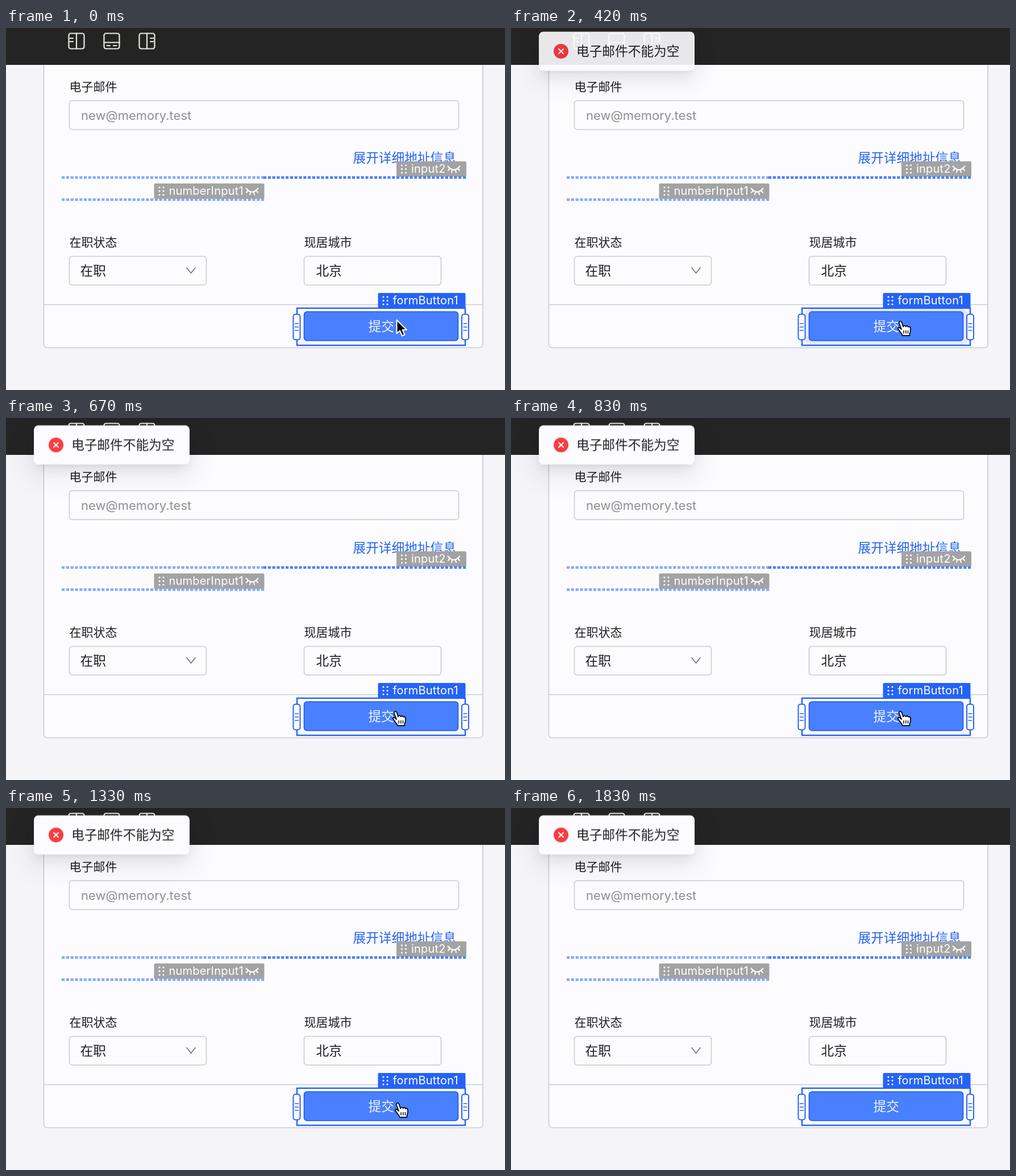
Animation of 878 by 638 pixels, one loop 2.33 s. Source, as an HTML page:

```html
<!DOCTYPE html>
<html lang="zh-CN">
<head>
<meta charset="utf-8">
<title>表单校验</title>
<style>
  html, body { margin: 0; width: 100%; height: 100%; overflow: hidden; background: #f5f5f9; }
  svg { position: absolute; left: 0; top: 0; display: block; }
  text { font-family: Inter, "Noto Sans CJK SC", "Noto Sans CJK", sans-serif; }

  .label { font-size: 21px; fill: #1d1d22; }
  .value { font-size: 22.7px; fill: #1d1d22; }
  .tag { font-size: 20px; letter-spacing: .2px; fill: #fff; }
  .field { fill: #fcfcff; stroke: #c7cbd4; stroke-width: 1.6; }
  .line { fill: none; stroke-linecap: round; stroke-linejoin: round; }
  .dots { stroke-width: 4.6; stroke-dasharray: 5.2 2.6; }
  .handle { fill: #fff; stroke: #2563f8; stroke-width: 2; }

  .toast {
    position: absolute; left: 49px; top: 13px; width: 274px; height: 68.5px;
    border-radius: 8px; background: #fcfcff;
    box-shadow: 0 5px 10px -6px #0000001f, 0 10px 26px #00000014, 0 15px 45px 13px #0000000f;
  }

  .toast, .wave, .arrow, .hand { animation: 2330ms step-end infinite; }
  .toast { animation-name: toast; }
  .wave { animation-name: wave; }
  .arrow { animation-name: arrow; }
  .hand { animation-name: hand; }

  @keyframes toast {
    0% { opacity: 0; transform: translateY(-6.5px); }
    18.02% { opacity: .91; transform: translateY(-6.5px); }
    21.45% { opacity: .99; transform: translateY(-1px); }
    24.88%, 100% { opacity: 1; transform: none; }
  }
  @keyframes wave {
    0% { opacity: 0; }
    18.02% { opacity: .12; }
    21.45% { opacity: .06; }
    24.88% { opacity: .03; }
    28.74%, 100% { opacity: 0; }
  }
  @keyframes arrow {
    0% { opacity: 1; transform: none; }
    10.72% { opacity: 0; }
    67.8% { opacity: 1; transform: translate(37px, 53px); }
    71.66% { opacity: 1; transform: translate(44px, 73px); }
    75.1% { opacity: 1; transform: translate(49px, 89px); }
    78.53%, 100% { opacity: 0; }
  }
  @keyframes hand {
    0% { opacity: 0; transform: none; }
    10.72% { opacity: 1; transform: none; }
    57.07% { opacity: 1; transform: translate(4px, 3px); }
    60.93% { opacity: 1; transform: translate(15px, 14px); }
    64.36% { opacity: 1; transform: translate(27px, 29px); }
    67.8%, 100% { opacity: 0; }
  }
</style>
</head>
<body>
<svg width="878" height="638" viewBox="0 0 878 638">
  <defs>
    <g id="grip" fill="#fff">
      <circle cx="0" cy="-6.5" r="1.6"/><circle cx="7" cy="-6.5" r="1.6"/>
      <circle cx="0" cy="0" r="1.6"/><circle cx="7" cy="0" r="1.6"/>
      <circle cx="0" cy="6.5" r="1.6"/><circle cx="7" cy="6.5" r="1.6"/>
    </g>
    <path id="eye" class="line" stroke="#fff" stroke-width="2"
      d="M-10.5 -5Q0 8 10.5 -5M-7 -1L-10 2.5M-2.8 1.5L-4 6M2.8 1.5L4 6M7 -1L10 2.5"/>
    <g id="handle">
      <rect class="handle" x="-6" y="-22.5" width="12" height="45" rx="4"/>
      <path d="M-3.5 -6h7M-3.5 0h7M-3.5 6h7" stroke="#2563f8" stroke-width="1.6"/>
    </g>
    <g id="sidebar">
      <rect x="-13.5" y="-13.5" width="27" height="27" rx="3.5"/>
      <path d="M0 -13.5v27M-11.5 -5h5.5M-11.5 1h5.5"/>
    </g>
  </defs>

  <rect x="66.5" y="40" width="772.5" height="523.5" rx="6" class="field"/>
  <path d="M66.5 487.5H839" stroke="#c7cbd4" stroke-width="1.6"/>

  <rect width="878" height="65" fill="#242424"/>
  <g class="line" stroke="#e9e9e2" stroke-width="2.2">
    <use href="#sidebar" x="124" y="23"/>
    <use href="#sidebar" transform="translate(248 23) scale(-1 1)"/>
    <rect x="172.5" y="9.5" width="27" height="27" rx="3.5"/>
    <path d="M172.5 25.5h27M177.5 31h5.5M189 31h5.5"/>
  </g>

  <text class="label" x="111.5" y="110.7">电子邮件</text>
  <rect class="field" x="111.5" y="128" width="685" height="51" rx="5"/>
  <text x="132" y="161.5" font-size="22" fill="#8f8f90">new@memory.test</text>

  <text class="value" x="610.5" y="236.5" style="fill:#2462f5">展开详细地址信息</text>
  <rect x="687" y="235" width="123" height="27" rx="2" fill="#a3a3a4"/>
  <use href="#grip" x="696.5" y="248.5"/>
  <text class="tag" x="713" y="255.2">input2</text>
  <use href="#eye" x="788" y="248.5"/>
  <path class="dots" d="M98 263.5H453" stroke="#84a8ff"/>
  <path class="dots" d="M453 263.5H810" stroke="#4a7ff8"/>

  <rect x="260.5" y="274" width="194" height="27" rx="2" fill="#a3a3a4"/>
  <use href="#grip" x="270" y="287.5"/>
  <text class="tag" x="286.5" y="294.2">numberInput1</text>
  <use href="#eye" x="433" y="287.5"/>
  <path class="dots" d="M98 302.5H454.5" stroke="#84a8ff"/>

  <text class="label" x="111.5" y="384.7">在职状态</text>
  <rect class="field" x="111.5" y="402.5" width="241" height="50.5" rx="5"/>
  <text class="value" x="130.5" y="436">在职</text>
  <path class="line" d="M318 422.5L325.5 432L333 422.5" stroke="#777a86" stroke-width="1.8"/>
  <text class="label" x="524.5" y="384.7">现居城市</text>
  <rect class="field" x="524.5" y="402.5" width="241" height="50.5" rx="5"/>
  <text class="value" x="545.5" y="436">北京</text>

  <rect x="512" y="493.8" width="296" height="65.4" fill="#fcfcff" stroke="#2563f8" stroke-width="2.4"/>
  <rect class="wave" x="516" y="495" width="288" height="63" rx="10" fill="#2563f8"/>
  <rect x="524.5" y="500" width="271" height="51" rx="5" fill="#4880ff" stroke="#1d55ec" stroke-width="1.6"/>
  <text class="value" x="637.5" y="533.7" style="fill:#f0f4ff">提交</text>
  <path d="M654.5 495V469q0-2 2-2h150q2 0 2 2v26z" fill="#2563f8"/>
  <use href="#grip" x="664" y="480.5"/>
  <text class="tag" x="680.5" y="487">formButton1</text>
  <use href="#handle" x="511.5" y="527"/>
  <use href="#handle" x="808" y="527"/>

  <path class="arrow" fill="#000" stroke="#fff" stroke-width="2" stroke-linejoin="round"
    d="M687.5 514.5V538.5L693 533.5L697 542.5L701.5 540.5L697.5 532H705Z"/>
  <g class="hand" stroke="#000" stroke-width="1.7" stroke-linejoin="round">
    <path fill="#fff" d="M683 520.5q-.5-3.5 2-3.5q2 0 2.8 2.5l2.2 7q.5-2 2.5-2q1.8 0 2.2 2q.5-1.3 2.2-1.3q1.6 0 2 1.8q.6-.8 2-.6q2 .3 2 3.2v4q-.3 3-1.5 5v3.5h-12.5q-.5-2.5-3-5l-4.5-6q-1.2-2 .3-3q1.5-.8 3.3 1l2 2z"/>
    <path fill="none" d="M691.1 533v5.5M694.8 533v5.5M698.5 533v5.5" stroke-width="1.4"/>
  </g>
</svg>

<div class="toast">
  <svg width="274" height="69">
    <circle cx="39" cy="34.5" r="13" fill="#fa3c41"/>
    <path class="line" d="M35 30.5l8 8M43 30.5l-8 8" stroke="#fff" stroke-width="2"/>
    <text class="value" x="66" y="42.7">电子邮件不能为空</text>
  </svg>
</div>
</body>
</html>
```
